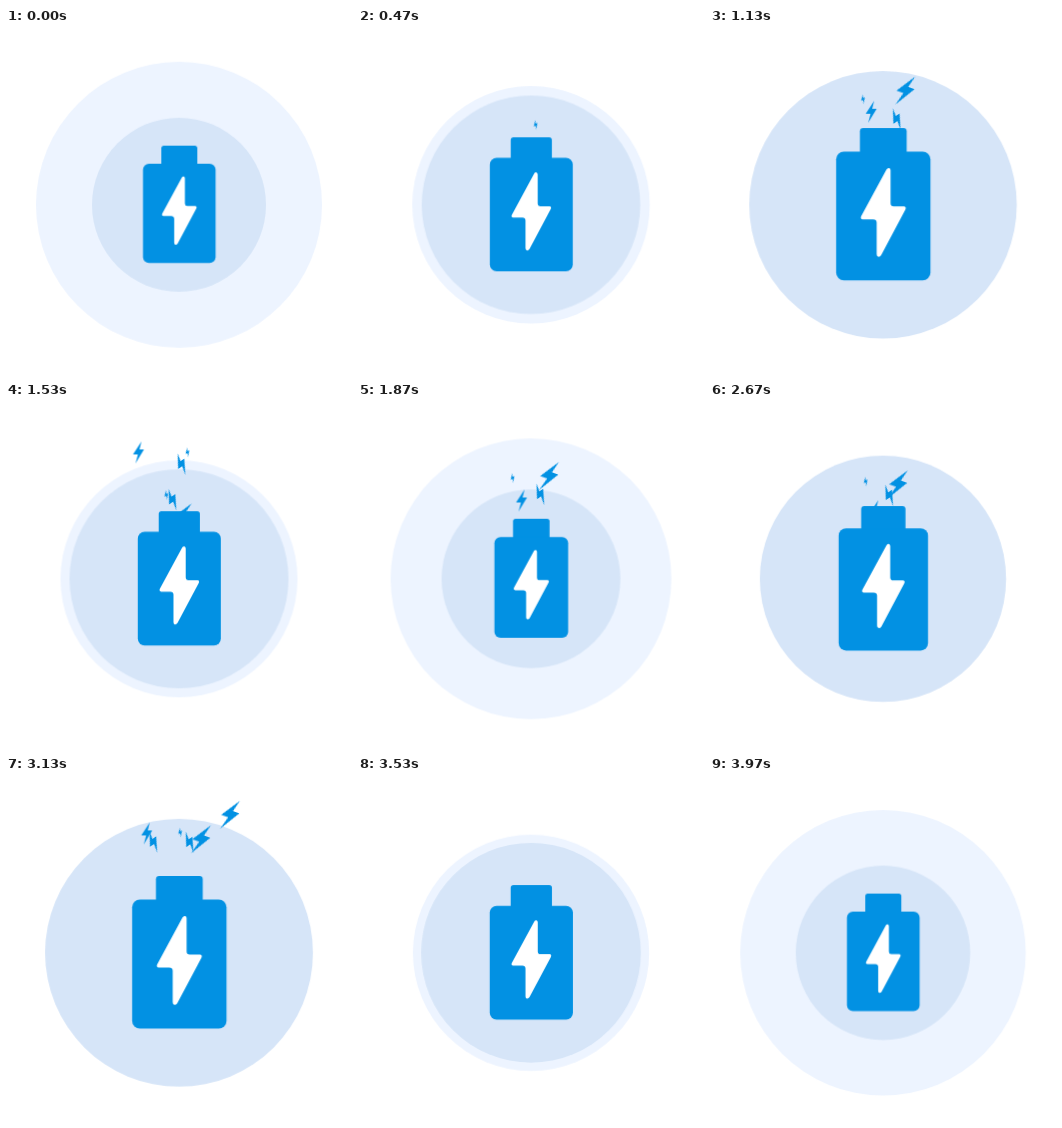
These frames come from a looping animation (346x346 px, 4.01 s). An HTML page without scripts:

```html
<!DOCTYPE html>
<html lang="en">
<head>
<meta charset="utf-8">
<title>Charging battery</title>
<style>
  html, body { margin: 0; width: 100%; height: 100%; overflow: hidden; background: #fff; }
  svg { display: block; width: 100%; height: 100%; }

  .pulse { animation: 1002.5ms cubic-bezier(.333, 0, .667, 1) infinite alternate; }
  .halo { fill: #edf4ff; animation-name: shrink; }
  .disc { fill: #d6e5f8; animation-name: swell; }
  .battery { animation-name: grow; }
  @keyframes shrink { to { transform: scale(.627); } }
  @keyframes swell { to { transform: scale(1.563); } }
  @keyframes grow { to { transform: scale(1.313); } }

  .blue { fill: #0291e3; }
  .mark { fill: #fff; }

  /* --d is the delay in ticks, 120 ticks per loop */
  .spark {
    opacity: 0;
    animation: 4010ms linear calc(var(--d) * 33.417ms) infinite;
  }
  .tiny { animation-name: tiny; }
  .left { animation-name: left; }
  .right { animation-name: right; }
  .big { animation-name: big; }
  .stray { animation-name: stray; }

  @keyframes tiny {
    0%, 8.33% { transform: translate(177px, 145px); opacity: 1; }
    11.67% { transform: translate(178px, 97px); }
    14.17% { transform: translate(168px, 94px); }
    17.5% { transform: translate(160px, 93px); }
    28.33% { transform: translate(153px, 71px); }
    35.83% { transform: translate(175px, 56px); }
    38.33% { transform: translate(182px, 50px); }
    40% { transform: translate(186px, 46px); opacity: 1; }
    40.01%, 100% { transform: translate(186px, 46px); opacity: 0; }
  }
  @keyframes left {
    0%, 11.67% { transform: translate(156px, 150px); opacity: 1; }
    14.17% { transform: translate(156px, 111px); }
    17.5% { transform: translate(167px, 97px); }
    28.33% { transform: translate(187px, 91px); }
    35.83% { transform: translate(183.5px, 65.5px); }
    38.33% { transform: translate(175px, 62px); }
    40% { transform: translate(170px, 59px); opacity: 1; }
    40.01%, 100% { transform: translate(170px, 59px); opacity: 0; }
  }
  @keyframes right {
    0%, 17.5% { transform: translate(172px, 150px); opacity: 1; }
    28.33% { transform: translate(161px, 83px); }
    35.83% { transform: translate(140px, 56.5px); }
    38.33% { transform: translate(132px, 50px); }
    40% { transform: translate(127px, 46px); opacity: 1; }
    40.01%, 100% { transform: translate(127px, 46px); opacity: 0; }
  }
  @keyframes big {
    0%, 13.33% { transform: translate(170px, 152px); opacity: 1; }
    17.5% { transform: translate(176px, 114px); }
    28.33% { transform: translate(195.5px, 62px); }
    35.83% { transform: translate(225px, 38px); }
    37.8% { transform: translate(229px, 35px); opacity: 1; }
    37.81%, 100% { transform: translate(229px, 35px); opacity: 0; }
  }
  @keyframes stray {
    0%, 17.5% { transform: translate(163px, 150px); opacity: 1; }
    28.33% { transform: translate(147px, 64px); }
    36.67% { transform: translate(137px, 46px); opacity: 1; }
    36.68%, 100% { transform: translate(137px, 46px); opacity: 0; }
  }
</style>
</head>
<body>
<svg viewBox="0 0 346 346">
  <defs>
    <path id="bolt" d="M3-11-5.5 2H-.6L-3 11 5.5-3H1Z"/>
    <use id="t" href="#bolt" transform="rotate(-20) scale(.43)"/>
    <use id="l" href="#bolt" transform="rotate(-35)"/>
    <use id="r" href="#bolt"/>
    <use id="b" href="#bolt" transform="rotate(20) scale(1.5)"/>
  </defs>

  <g transform="translate(173 176.8)">
    <circle class="pulse halo" r="143"/>
    <circle class="pulse disc" r="87"/>
  </g>

  <g class="blue">
    <g class="spark tiny" style="--d:0"><use href="#t"/></g>
    <g class="spark left" style="--d:0"><use href="#l"/></g>
    <g class="spark right" style="--d:0"><use href="#r"/></g>
    <g class="spark big" style="--d:0"><use href="#b"/></g>

    <g class="spark tiny" style="--d:25"><use href="#t"/></g>
    <g class="spark left" style="--d:25"><use href="#l"/></g>
    <g class="spark right" style="--d:25"><use href="#r"/></g>
    <g class="spark big" style="--d:25"><use href="#b"/></g>

    <g class="spark tiny" style="--d:51"><use href="#t"/></g>
    <g class="spark left" style="--d:51"><use href="#l"/></g>
    <g class="spark right" style="--d:51"><use href="#r"/></g>
    <g class="spark big" style="--d:51"><use href="#b"/></g>

    <g class="spark stray" style="--d:60"><use href="#l"/></g>
    <g class="spark big" style="--d:60"><use href="#b"/></g>
  </g>

  <g transform="translate(173.3 176.7)">
    <g class="pulse battery">
      <rect class="blue" x="-18" y="-59" width="36" height="30" rx="2.5"/>
      <rect class="blue" x="-36.3" y="-41" width="72.6" height="99.3" rx="6"/>
      <path class="mark" d="M2.4-27Q3.2-28.6 4.6-28.2 5.6-27.8 5.6-26.5V-1.2Q5.6 1.3 8 1.3H15.8Q18 1.5 17 3.8L-1.6 38.8Q-2.6 40.3-4 40-5.1 39.6-5.1 38V13.8Q-5.2 11.3-7.8 11.3H-15.8Q-18 11-17 8.8Z"/>
    </g>
  </g>
</svg>
</body>
</html>
```
